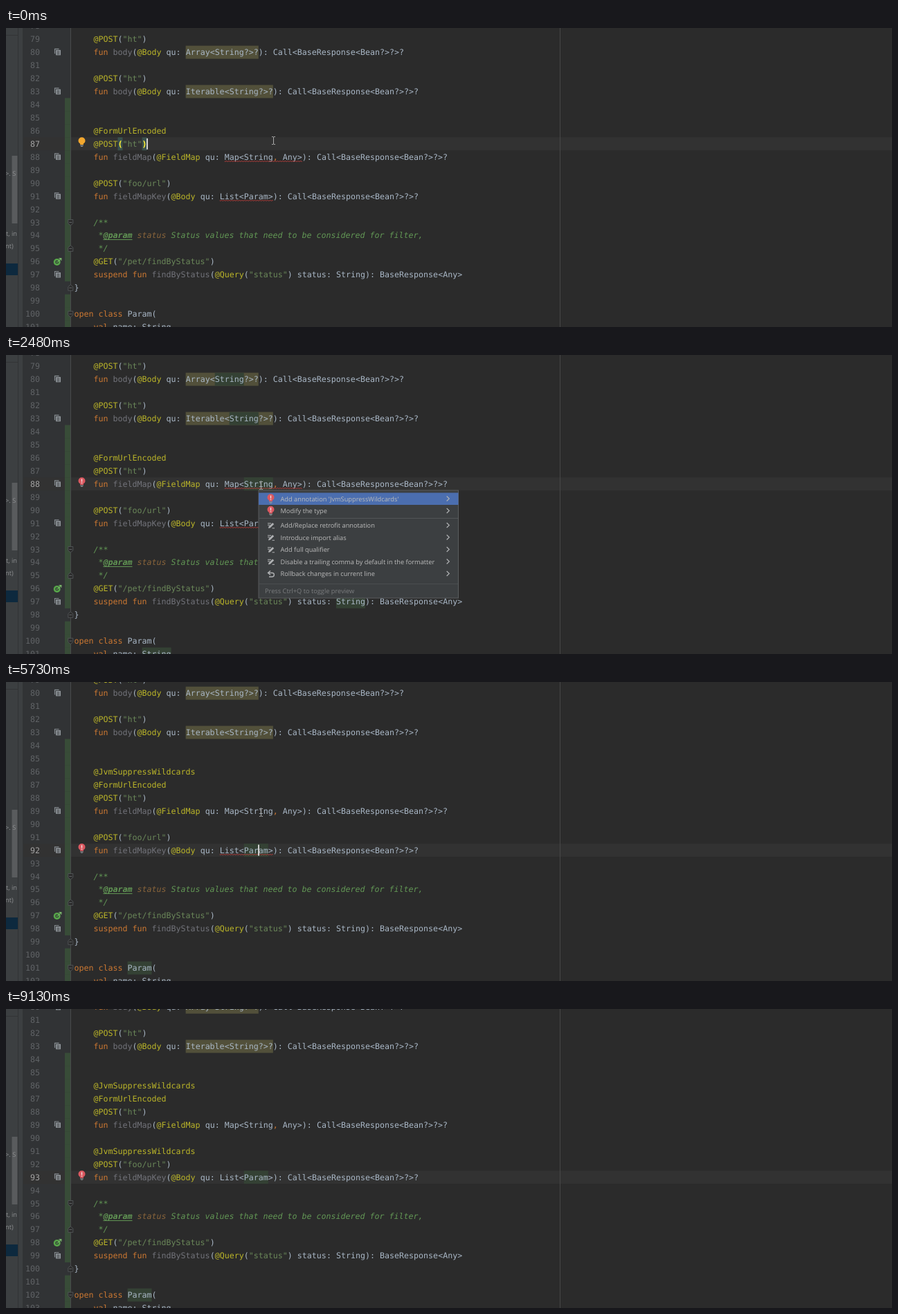
Write an HTML page with a canvas that moves like this. It is 1280x433 px and loops after 9.21 s.

```html
<!DOCTYPE html>
<html lang="en">
<head>
<meta charset="utf-8">
<title>Editor quick fix</title>
<style>
html, body { margin: 0; width: 100%; height: 100%; overflow: hidden; background: #2b2b2b; }
canvas { display: block; width: 1280px; height: 433px; }
</style>
</head>
<body>
<canvas id="stage" width="1280" height="433"></canvas>
<script>
const LOOP = 9210;
const ctx = document.getElementById('stage').getContext('2d');
const CHAR = 7.01, LEFT = 98.4, PITCH = 18.95;
const MONO = '"DejaVu Sans Mono", monospace', SANS = '"Open Sans", "Noto Sans", sans-serif';
const CODE = `11.64px ${MONO}`, UI = `9.25px ${SANS}`, DOC = `10.5px ${SANS}`;
const color = {
  text: '#a9b7c6', note: '#bbb529', string: '#6a8759', keyword: '#cc7832',
  unused: '#72737a', doc: '#629755', param: '#8a653b', link: '#589df6', ui: '#bbbbbb'
};
const ANNOTATION = '    @JvmSuppressWildcards';
const FIRST_LINE = 78;
const source = `
    @POST("ht")
    fun body(@Body qu: Array<String?>?): Call<BaseResponse<Bean?>?>?

    @POST("ht")
    fun body(@Body qu: Iterable<String?>?): Call<BaseResponse<Bean?>?>?


    @FormUrlEncoded
    @POST("ht")
    fun fieldMap(@FieldMap qu: Map<String, Any>): Call<BaseResponse<Bean?>?>?

    @POST("foo/url")
    fun fieldMapKey(@Body qu: List<Param>): Call<BaseResponse<Bean?>?>?

    /**
     *@param status Status values that need to be considered for filter,
     */
    @GET("/pet/findByStatus")
    suspend fun findByStatus(@Query("status") status: String): BaseResponse<Any>
}

open class Param(
    val name: String`.split('\n');

// time, row, column, visible
const caretKeys = [
  [0, 8, 15, 1], [280, 8, 15, 0], [750, 8, 15, 1], [1270, 8, 15, 0],
  [1670, 9, 38, 1], [2330, 9, 38, 0], [3540, 9, 38, 1],
  [4140, 10, 0, 1], [4270, 11, 20, 1], [4600, 12, 38, 1], [5860, 12, 38, 0],
  [6730, 12, 38, 1], [8230, 12, 38, 0], [8730, 12, 38, 1], [9130, 12, 38, 0]
];

const within = (t, from, to) => t >= from && t < to;
const rowY = row => 16.2 + row * PITCH;
const colX = col => LEFT + col * CHAR;

function rect(x, y, w, h, fill) {
  ctx.fillStyle = fill;
  ctx.fillRect(x, y, w, h);
}

function text(str, x, baseline, fill, font, align = 'left') {
  ctx.font = font;
  ctx.fillStyle = fill;
  ctx.textAlign = align;
  ctx.fillText(str, x, baseline);
  return x + ctx.measureText(str).width;
}

function path(d, stroke, width = 1, x = 0, y = 0, fill) {
  const shape = new Path2D(d);
  ctx.save();
  ctx.translate(x, y);
  if (fill) { ctx.fillStyle = fill; ctx.fill(shape); }
  if (stroke) { ctx.strokeStyle = stroke; ctx.lineWidth = width; ctx.stroke(shape); }
  ctx.restore();
}

function disc(x, y, r, fill) {
  ctx.fillStyle = fill;
  ctx.beginPath();
  ctx.arc(x, y, r, 0, 7);
  ctx.fill();
}

function copyIcon(x, y) {
  path('M-4 3V-4H2', '#858b90', 1.2, x, y);
  rect(x - 2.5, y - 2.5, 7, 7.5, '#8f959a');
  for (const dy of [-0.8, 1.1, 3]) rect(x - 1, y + dy, 4, 0.9, '#3a3d3f');
}

function endpointIcon(x, y) {
  disc(x - 0.8, y + 0.6, 5, '#57a64a');
  disc(x - 0.8, y + 0.6, 2.4, '#313335');
  disc(x - 0.8, y + 0.6, 1.2, '#57a64a');
  path('M0 0L4 -4M1.5 -4.8H4.8V-1.5', '#7bb86c', 1.2, x + 0.5, y);
}

function foldIcon(x, y, flip) {
  const s = flip ? -1 : 1;
  path(`M-3.5 ${-4 * s}H3.5V${1.5 * s}L0 ${4.5 * s}L-3.5 ${1.5 * s}Z`, '#54575a', 0.9, x + 0.3, y, '#2b2b2b');
  rect(x - 1.7, y - 0.5, 4, 1, '#606366');
}

function bulb(x, y, red) {
  const glass = red ? '#db5860' : '#f2a72e';
  path('M-2.4 4V2.6C-3.6 1.8 -5 0.5 -5 -1.7A5 5 0 0 1 5 -1.7C5 0.5 3.6 1.8 2.4 2.6V4Z', null, 0, x, y, glass);
  rect(x - 2.3, y + 4.6, 4.6, 1.1, '#8f9498');
  rect(x - 1.4, y + 6, 2.8, 0.9, '#8f9498');
  if (red) {
    rect(x - 0.7, y - 4.5, 1.4, 4.2, '#f3dede');
    rect(x - 0.7, y + 0.7, 1.4, 1.4, '#f3dede');
  }
}

function dots(x, y) {
  for (const dy of [-4, 0, 4]) disc(x, y + dy, 1.2, '#b4b6b8');
}

function tokens(line, muted) {
  if (line.includes('*@param')) {
    return [['     *', 'doc'], ['@param', 'tag'], [' status', 'param'], [line.slice(19), 'doc']];
  }
  if (/\/\*|\*\//.test(line)) return [[line, 'doc']];
  const rule = /@\w+|"[^"]*"|\b(?:fun|suspend|open|class|val)\b|(?<=fun )\w+|,|[^@",\w]+|\w+/g;
  return (line.match(rule) || []).map((word, i, all) => {
    if (word[0] === '@') return [word, muted ? 'text' : 'note'];
    if (word[0] === '"') return [word, 'string'];
    if (word === ',' || /^(fun|suspend|open|class|val)$/.test(word)) return [word, 'keyword'];
    return [word, all[i - 2] === 'fun' ? 'unused' : 'text'];
  });
}

function drawCode(line, y, muted) {
  let col = 0;
  for (const [word, kind] of tokens(line, muted)) {
    const style = kind === 'tag' ? 'italic bold ' : /doc|param/.test(kind) ? 'italic ' : '';
    text(word, colX(col), y + 4, color[kind] || color.doc, style + CODE);
    if (kind === 'tag') rect(colX(col), y + 5.5, word.length * CHAR, 1, color.doc);
    col += word.length;
  }
}

function mark(line, pattern, y, fill) {
  for (const m of line.matchAll(pattern)) {
    rect(colX(m.index), y - 9.5, m[0].length * CHAR, PITCH, fill);
  }
}

function squiggle(line, word, y) {
  const start = line.indexOf(word);
  if (start < 0) return;
  ctx.beginPath();
  for (let x = 0; x <= word.length * CHAR; x++) {
    ctx.lineTo(colX(start) + x, y + 6.3 + 0.4 * Math.sin(x * 1.7));
  }
  ctx.strokeStyle = '#bc3f3c';
  ctx.lineWidth = 1;
  ctx.stroke();
}

function sidePanel() {
  rect(0, 0, 25, 433, '#3c3f41');
  rect(0, 10, 17, 1, '#323435');
  rect(0, 341, 17, 17, '#0d293e');
  rect(8.5, 185, 8, 98, '#595b5d');
  rect(17, 0, 1, 433, '#313335');
  rect(24, 0, 1, 433, '#323435');
  ctx.save();
  ctx.beginPath();
  ctx.rect(0, 0, 17, 433);
  ctx.clip();
  text('>. S', -1, 214, '#8c8e90', UI);
  text('t, in', 0, 301, '#8c8e90', UI);
  text('nt)', -1, 319, '#8c8e90', UI);
  ctx.restore();
}

function editor(t) {
  const lines = source.slice();
  if (t >= 6730) lines.splice(12, 0, ANNOTATION);
  if (t >= 3540) lines.splice(8, 0, ANNOTATION);
  const inserted = lines.length - source.length;
  const [, caretRow, caretCol, caretOn] = caretKeys.findLast(key => key[0] <= t);
  const word = within(t, 1740, 4140) ? /\bString\b/g : t >= 4600 ? /\bParam\b/g : null;

  rect(0, 0, 1280, 433, '#2b2b2b');
  rect(25, 0, 68, 433, '#313335');
  rect(25, rowY(caretRow) - 9.5, 1255, PITCH, '#323232');
  rect(93, 0, 1, 433, '#484a4b');
  rect(800, 0, 1, 433, '#474747');
  sidePanel();

  lines.forEach((line, i) => {
    const row = i - 1 - inserted, y = rowY(row);
    if (row < -1) return;
    if (i >= 6 && line !== '}') rect(85, y - 9.5, 8, PITCH + 0.2, '#384c38');
    text(FIRST_LINE + i, 49, y + 4, row === caretRow ? '#a4a3a3' : '#606366', CODE, 'right');
    if (line.includes('fun ')) copyIcon(74.5, y - 0.8);
    if (line.includes('@GET')) endpointIcon(74.5, y);
    if (/\/\*\*|class/.test(line)) foldIcon(93, y);
    if (/\*\/|^}/.test(line)) foldIcon(93, y, true);

    mark(line, /(Array|Iterable)<String\?>\?/g, y, '#52503a');
    if (word) mark(line, word, y, '#344134');
    const matching = row === caretRow && line.includes('@POST');
    if (matching) mark(line, /[()]/g, y, '#3b514d');
    const muted = line === ANNOTATION && (within(t, 3540, 3870) || (i > 9 && t < 7060));
    drawCode(line, y, muted);
    if (matching) {
      for (const m of line.matchAll(/[()]/g)) text(m[0], colX(m.index), y + 4, '#ffef28', 'bold ' + CODE);
    }
    if (t < 4070) squiggle(line, 'Map<String, Any>', y);
    if (t < 7260) squiggle(line, 'List<Param>', y);
  });

  if (t < 1670) bulb(109.5, rowY(8) - 2.8, false);
  if (within(t, 2480, 4070)) bulb(109.5, rowY(9) - 2.8, true);
  if (t >= 5730) bulb(109.5, rowY(12) - 2.8, true);
  if (caretOn) rect(Math.floor(colX(caretCol)), rowY(caretRow) - 8, 2, 16, '#d0d0d0');
}

function flow(parts, x, y) {
  for (const [str, font = DOC, fill = color.ui] of parts) x = text(str, x, y, fill, font);
}

function hintPopup() {
  const code = `10.46px ${MONO}`, inline = `9.4px ${MONO}`;
  rect(365, 196, 408, 196, '#5d6062');
  rect(366, 197, 406, 53, '#4b4d4d');
  rect(366, 251, 406, 140, '#46494b');
  rect(366, 294, 406, 1, '#5c5f61');
  text('Type must not include a type wildcard', 374.5, 216.5, color.ui, UI);
  text("Add annotation 'JvmSuppressWildcards'", 374.5, 237.5, color.link, UI);
  text('Alt+Shift+Enter', 554, 237.5, '#919394', UI);
  text('More actions...', 642.5, 237.5, color.link, UI);
  text('Alt+Enter', 713.5, 237.5, '#919394', UI);
  dots(761, 211);
  dots(762, 381);
  flow([['public final class ', code, color.keyword], ['String', code, color.text]], 373, 269.8);
  flow([['    : Comparable<String>', code, color.text], [', ', code, color.keyword],
    ['CharSequence', code, color.text]], 373, 285);
  flow([['The '], ['String', inline],
    [' class represents character strings. All string literals in Kotlin']], 373, 312);
  flow([['programs, such as '], ['"abc"', inline],
    [', are implemented as instances of this class.']], 373, 328);
  text('kotlin', 376, 347.5, color.link, inline);
  text('kotlin.kotlin_builtins', 376, 363.5, color.ui, DOC);
  path('M0 0H4L5.5 2H11V9H0Z', null, 0, 374, 373, '#9aa7b0');
  rect(379, 377, 8, 6, '#46494b');
  ['#62b543', '#9aa7b0', '#40b6e0'].forEach((c, i) => rect(380 + i * 2.3, 378 - (i === 1), 1.6, 5 + (i === 1), c));
  text('Gradle: org.jetbrains.kotlin:kotlin-stdlib:1.6.20 (kotlin-stdlib-1.6.20.jar)', 389, 381.5, color.ui, DOC);
}

const menuItems = [
  [208.5, "Add annotation 'JvmSuppressWildcards'", 'bulb'],
  [226, 'Modify the type', 'bulb'],
  [247, 'Add/Replace retrofit annotation', 'pencil'],
  [264.5, 'Introduce import alias', 'pencil'],
  [282, 'Add full qualifier', 'pencil'],
  [299.5, 'Disable a trailing comma by default in the formatter', 'pencil'],
  [317, 'Rollback changes in current line', 'undo']
];

function pencil(x, y) {
  path('M-4 4L-3.3 1.2L2.2 -4L4.2 -2L-1.2 3.3Z', null, 0, x, y, '#afb1b3');
  path('M-5 -3.2H0M-5 -0.8H-2M1.5 3.8H5', '#afb1b3', 1, x, y);
}

function menu(offset) {
  ctx.save();
  ctx.translate(0, offset);
  rect(364.5, 195.5, 289.5, 157, '#5a5d5f');
  rect(365.5, 196.5, 287.5, 155, '#3c3f41');
  rect(365, 199.5, 288.5, 17.5, '#4b6eaf');
  rect(366, 236, 287, 1, '#515456');
  rect(366, 331, 287, 1, '#4b4e50');
  for (const [y, label, icon] of menuItems) {
    if (icon === 'bulb') bulb(382.5, y - 0.5, true);
    if (icon === 'pencil') pencil(383, y);
    if (icon === 'undo') path('M-1 -4.5L-4.5 -1.5L-1 1.5M-4 -1.5H1.5A2.8 2.8 0 0 1 1.5 4.2H-3', '#afb1b3', 1.4, 383, y);
    text(label, 396.5, y + 3.4, color.ui, UI);
    path('M-1.8 -3.5L1.8 0L-1.8 3.5', '#afb1b3', 1.2, 638.5, y - 0.5);
  }
  text('Press Ctrl+Q to toggle preview', 374, 344.8, '#7b7d7f', UI);
  ctx.restore();
}

function pointer(t) {
  let x = 386, y = 163;
  const approach = t < 150 ? 0 : Math.min(1, (Math.floor((t - 150) / 67.5) + 1) / 5);
  x -= 18 * approach;
  y += 26 * approach;
  if (t >= 7720) {
    const step = Math.floor((t - 7720) / 70) + 1;
    if (step >= 10) return;
    const p = (step / 10) ** 1.4;
    x += 804 * p;
    y += 226 * p;
  }
  path('M-2.5 -5.5H-0.8L0 -5L0.8 -5.5H2.5M0 -5V5M-2.5 5.5H-0.8L0 5L0.8 5.5H2.5',
    '#bcbcbc', 0.9, Math.round(x) + 0.5, Math.round(y));
}

function draw(now) {
  const t = now % LOOP;
  ctx.textRendering = 'geometricPrecision';
  editor(t);
  if (within(t, 880, 1670)) hintPopup();
  if (within(t, 2480, 3470)) menu(0);
  if (within(t, 5860, 6660)) menu(57);
  pointer(t);
}

const start = performance.now();
function tick() {
  draw(performance.now() - start);
  requestAnimationFrame(tick);
}
tick();
</script>
</body>
</html>
```
